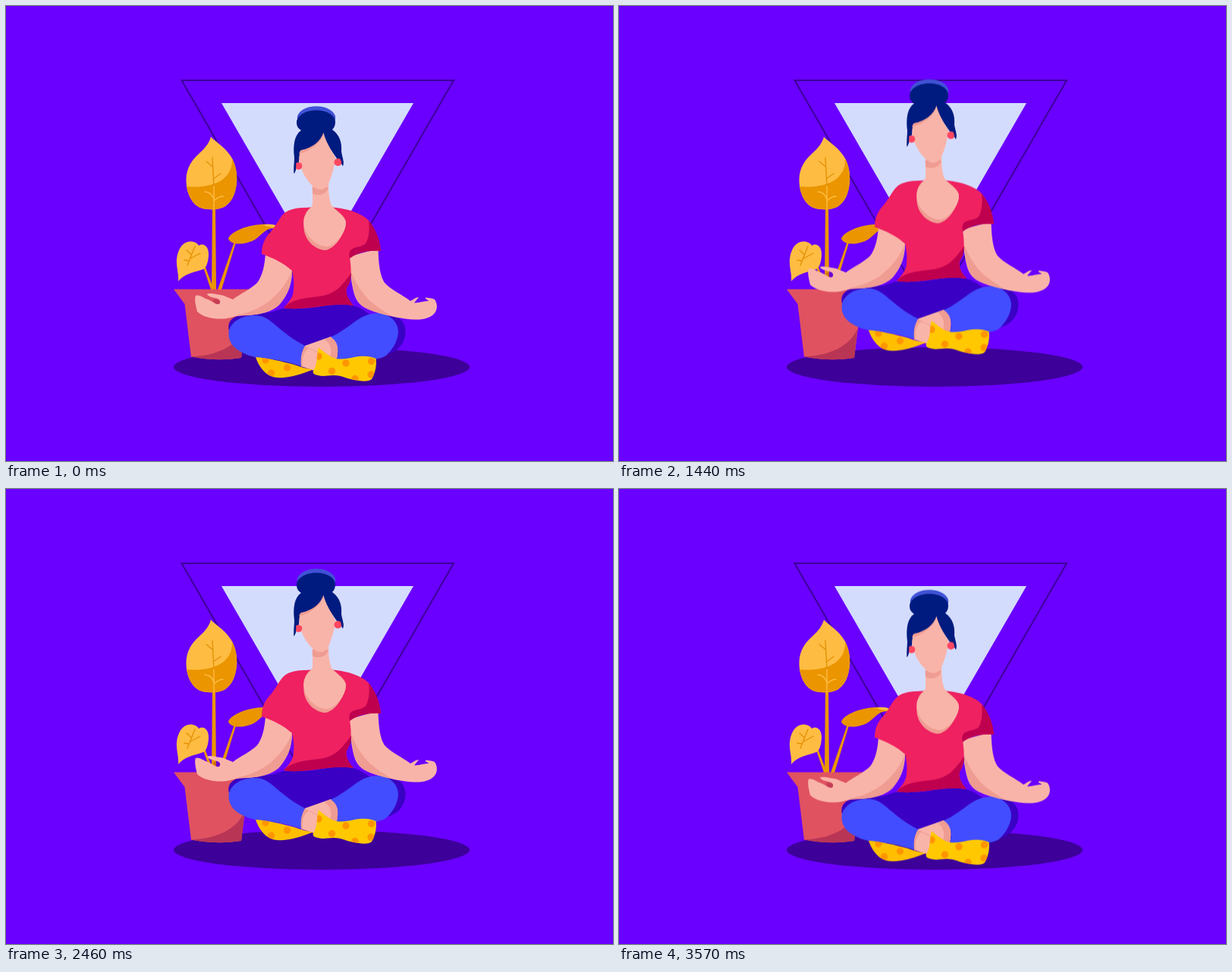
Animation, 800 px wide and 600 px high, one loop 3.6 s. Source, as an HTML page:

```html
<!DOCTYPE html>
<html lang="en">
<head>
<meta charset="utf-8">
<title>Levitating meditation</title>
<style>
  html, body { margin: 0; width: 100%; height: 100%; overflow: hidden; background: #6a00ff; }
  svg { display: block; width: 800px; height: 600px; }

  .shadow { fill: #3d0099; }
  .frame { fill: none; stroke: #3d0099; stroke-width: 2; }
  .window { fill: #d4dcfe; }
  .pot { fill: #e05260; }
  .pot-dark { fill: #b83556; }
  .leaf { fill: #ffbc42; }
  .leaf-dark { fill: #eb9500; }
  .vein { fill: none; stroke: #e39208; stroke-width: 1.4; stroke-linecap: round; }
  .vein.light { stroke: #ffbc42; }
  .skin { fill: #f9b4a9; }
  .skin-dark { fill: #ef9c92; }
  .crease { fill: none; stroke: #ef9c92; stroke-width: 1; }
  .hair { fill: #001b80; }
  .hair-light { fill: #4052d6; }
  .earring { fill: #ff4660; }
  .shirt { fill: #ef2160; }
  .shirt-dark { fill: #bf004f; }
  .trousers { fill: #424dff; }
  .trousers-dark { fill: #3a00c4; }
  .sock { fill: #ffc800; }
  .sock-back { fill: #ffbf00; }
  .dots { fill: #ff9500; }

  .woman { animation: float 3600ms linear infinite; }
  @keyframes float {
    0% { transform: translateY(0); }
    49.583% { transform: translateY(-44px); }
    99.167% { transform: translateY(.75px); }
    100% { transform: translateY(0); }
  }
</style>
</head>
<body>
<svg viewBox="0 0 800 600" xmlns="http://www.w3.org/2000/svg">
  <defs>
    <path id="big-leaf" d="M270 172.500C276 179 287 185 294 195C302 205 305 219 304 232C303 245 299 257 289 264C282 269 263 270 254 265C243 259 237 243 237.500 228C238 213 245 203 255 194C263 187 268 180 270 172.500Z"/>
    <path id="back-sock" d="M329 463C345 464 365 469 380 473C388 476 395 478 405 479.500C395 483 383 488 370 489.500C360 491 351 490 345 486C337 480 332 472 329 463Z"/>
    <path id="front-sock" d="M412 450.500C418 455 424 461 432 464C440 467 450 465 459 463C469 461 479 461 487.500 465C489 475 486 485 482 492C477 497 464 494 454 492C446 490 441 487 432 487C424 487 418 489 411 487C405 486 403 483 406 479C411 471 409 460 412 450.500Z"/>
    <clipPath id="in-big-leaf"><use href="#big-leaf"/></clipPath>
    <clipPath id="in-back-sock"><use href="#back-sock"/></clipPath>
    <clipPath id="in-front-sock"><use href="#front-sock"/></clipPath>
  </defs>

  <ellipse class="shadow" cx="416" cy="476" rx="195" ry="26"/>
  <path class="frame" d="M231.500 98H590L410.700 409Z"/>
  <path class="window" d="M284 128H537L410.500 347Z"/>

  <g class="plant">
    <path class="leaf-dark" d="M272 264H276L277 374H271Z"/>
    <path class="leaf-dark" d="M300.500 312H303L284 374H279Z"/>
    <path class="leaf-dark" d="M260 344.500L262.500 343.500L274 374H270Z"/>

    <use class="leaf" href="#big-leaf"/>
    <path class="leaf-dark" clip-path="url(#in-big-leaf)" d="M236 238C268 241 300 232 298 200H310V272H236Z"/>
    <path class="vein" d="M272 200L274 238M264 205L272.500 212M283 221L273 228"/>
    <path class="vein light" d="M274 238V268M262 245C268 245 272 249 274 255M286 251C281 251 277 254 274 257"/>

    <path class="leaf-dark" d="M293 307C295 299 315 289 337 288C347 287 355 289 357 291V294C346 291 341 297 332 305C321 315 297 317 293 307Z"/>
    <path class="leaf" d="M339 288.500C347 287 355 288 358 291V294C351 291 345 292 339 288.500Z"/>

    <path class="leaf" d="M227 363C228 353 224 344 225 334C226 323 231 314 238 311.500C245 309 252 312 254 316C260 312 267 317 267 327C267 335 265 342 262 346C256 350 236 351 227 363Z"/>
    <path class="vein" d="M249 317L239 342M238 322L244.500 328M256 326L243 333M235 335L241.500 336"/>

    <path class="pot" d="M221 373.500H333L319 393L310 464Q277 469 244 462.500L235.500 393Z"/>
    <path class="pot-dark" d="M314.500 425L310 464Q277 469 244 462.500C278 461 304 449 314.500 425Z"/>
  </g>

  <g class="woman">
    <!-- legs -->
    <path class="trousers-dark" d="M294 428C291 416 299 409 312 407C330 403 345 407 358 401C372 396 390 400 405 398C422 395 438 391 452 394C467 396 472 402 480 407C493 403 510 407 517 411C525 416 528 426 526 435C523 449 513 457 500 460L440 440L394 449Z"/>
    <path class="skin" d="M394 448L428 436C437 440 439 452 436 465L406 481L389 475C387 464 390 455 394 448Z"/>
    <path class="skin-dark" d="M420 440L428 436C438 441 439 452 436 466L427 463C430 454 428 445 420 440Z"/>
    <path class="skin-dark" d="M394 449L399 451C391 457 390 466 391 476L388.500 475C387 464 390 455 394 449Z"/>
    <path class="crease" d="M394 449L411 457"/>
    <path class="trousers" d="M293.500 432C294 417 311 407 330 408C345 409 352 419 365 429C375 437 384 443 394 448C389 456 388 465 389 475C371 469 351 465 330 463.500C310 459 293 449 293.500 432Z"/>
    <path class="trousers" d="M428 436.500C441 431 453 421 463 414C472 408 481 405 490 405C507 406 517 417 517 430C516 445 507 455 502 460C497 465 486 466 478 466H436C440 453 437 442 428 436.500Z"/>

    <use class="sock-back" href="#back-sock"/>
    <g class="dots" clip-path="url(#in-back-sock)">
      <circle cx="342" cy="467" r="4.700"/>
      <circle cx="370.500" cy="477" r="4.700"/>
      <circle cx="349.500" cy="484" r="4.700"/>
    </g>
    <use class="sock" href="#front-sock"/>
    <g class="dots" clip-path="url(#in-front-sock)">
      <circle cx="412" cy="462" r="4.700"/>
      <circle cx="429.500" cy="481.500" r="4.700"/>
      <circle cx="448" cy="471" r="4.700"/>
      <circle cx="460" cy="491.500" r="4.700"/>
      <circle cx="481.500" cy="468.500" r="4.700"/>
      <circle cx="481" cy="486" r="4.700"/>
    </g>

    <!-- arms -->
    <path class="skin" d="M342 326C341 342 338 356 331 365C323 373 308 380 299 387C293 385 289 382 283 381C276 380 270 378 265 379.500C265 382 270 384 275 385C281 386 284 389 281 393C275 394 272 389 266 387C260 385 254 380 250 382C248 386 250 395 252 403C259 410 273 413 285 412.500C298 412 302 408 312 408C334 408 352 403 361 393C372 380 377 366 377 348L357 330Z"/>
    <path fill="#78003c" fill-opacity=".25" d="M274 387C281 386 284 389 281 393C277 394 274 391 273 388Z"/>
    <path class="skin-dark" d="M377 348C372 363 361 378 346 390C332 400 318 405 301 408.500C330 409 351 404 361 393C372 380 377 366 377 348Z"/>
    <path class="skin" d="M453 330C453 348 455 366 459 380C463 394 473 399 488 404C505 409 523 413 539 413.500C550 414 559 411 564 406C569 401 569 393 565 387C561 385 556 385 553 384.500C552 387 556 387 557 389C552 389 546 391 538 391.500C540 388 543 386 544 384C540 384 537 387 533 389C523 381 507 374 499 365C493 356 491 341 490.500 320Z"/>
    <path class="skin-dark" d="M455 350C460 364 469 379 481 390C490 398 500 403 508 409C488 404 470 400 463 388C457 378 456 364 455 350Z"/>

    <!-- torso -->
    <path class="shirt" d="M402 265.500C389 266 373 266 365 275C358 283 354 293 347 300C340 308 337 316 337 327C352 332 366 339 377 349C379 357 380 365 379 374C379 384 372 391 366 398C395 403 426 390 458 395C451 387 447 379 449 372C455 363 456 349 453 332C465 324 478 322 494 323C492 309 487 295 479 284C470 273 449 267 430 265.500Z"/>
    <path class="shirt-dark" d="M478 283C488 295 493 309 494 323C478 322 465 324 453 333C452 328 452 324 455 321C462 316 473 319 476 309C479 301 479 292 478 283Z"/>
    <path class="shirt-dark" d="M366 398C377 386 396 385 413 383C434 380 442 370 455 352C455 360 453 366 449 372C447 379 451 387 458 395C426 390 395 403 366 398Z"/>
    <path class="skin-dark" d="M401 266C393 272 391 283 393 297C396 311 408 321 420 322C433 321 444 304 448 288C449 278 438 272 430 264Z"/>
    <path class="skin" d="M404 236V261C403 267 396 271 393 279C391 289 394 299 402 307C410 315 418 318 425 317C437 313 447 299 448 287C449 276 430 270 428 260C426 254 425 246 425 234Z"/>
    <path class="skin-dark" d="M403.500 239H425V237C425 244 419 249 412 249C409 249 406 249 404 247Z"/>

    <!-- head -->
    <ellipse class="hair-light" cx="409" cy="147.500" rx="25.200" ry="15.300"/>
    <path class="hair" d="M409 137.500C423 137.500 434 144 434 153C434 158 432 161 430 163C440 170 443 181 442 192C443 199 446 204 444 211C441 207 440 202 436 201L418 175L389 196C386 202 386 208 384 211C382 214 382 218 379.500 221C379 214 380 207 380 200C378 184 380 170 389 164C384 161 383 157 383 153C384 144 395 137.500 409 137.500Z"/>
    <path class="skin" d="M418.500 167C421 178 428 189 434.500 200C433 212 430 222 426 232C423 240 418 242.500 413 242C403 240 393 225 389 214C386 207 385 199 388 193C404 189 414 181 418.500 167Z"/>
    <path class="skin-dark" d="M418.500 167C415 181 402 191 386 195C387 193 387 191 389 190C404 187 414 179 418.500 167Z"/>
    <circle class="earring" cx="385.500" cy="211" r="4.800"/>
    <path class="hair" d="M380 203C382 206 383 209 382 213C382 217 381 219 379.500 221Z"/>
    <circle class="earring" cx="437.500" cy="206" r="5"/>
    <path class="hair" d="M441 196C443 201 446 205 444 211C441 206 441 201 441 196Z"/>
  </g>
</svg>
</body>
</html>
```
